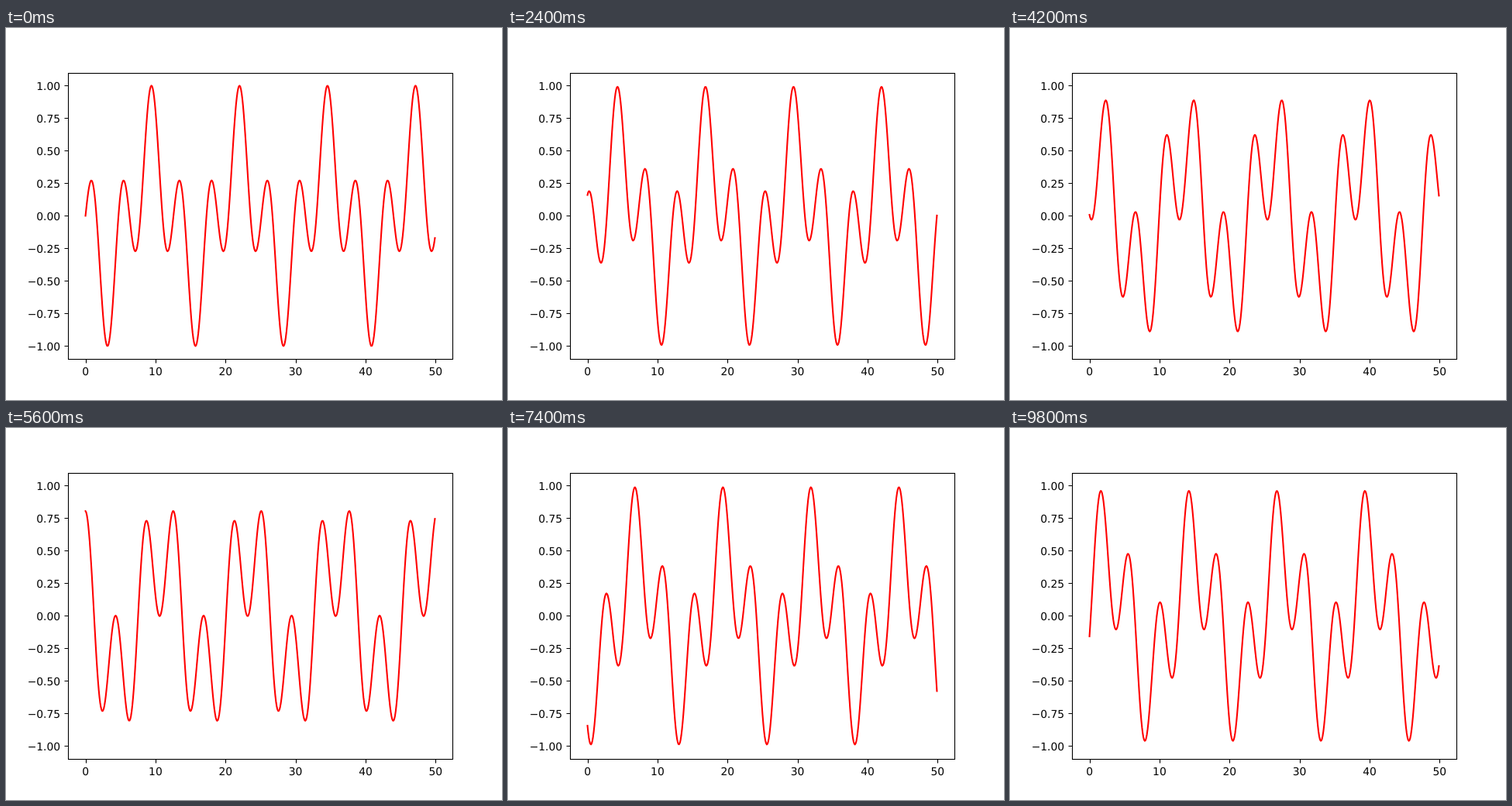
Recreate the animation shown at these times as an HTML page. Size 640 px wide and 480 px high, loop 10 s.

```html
<!DOCTYPE html>
<html lang="en">
<head>
<meta charset="utf-8">
<title>Travelling wave product</title>
<style>
  html, body { margin: 0; width: 100%; height: 100%; overflow: hidden; background: #fff; }
  svg { display: block; width: 640px; height: 480px; }
  text { font: 13.889px "DejaVu Sans", sans-serif; text-rendering: geometricPrecision; }
  .x { text-anchor: middle; }
  .y { text-anchor: end; }
  .axes { fill: none; stroke: #000; stroke-width: 1.111; }
  .curve { fill: none; stroke: #f00; stroke-width: 2.083; stroke-linecap: square; stroke-linejoin: round; }
</style>
</head>
<body>
<svg viewBox="0 0 640 480">
  <path class="curve" id="curve"/>
  <path class="axes" id="ticks"/>
  <rect class="axes" x="80.5" y="58.5" width="496" height="369"/>
  <g id="labels"></g>
</svg>
<script>
const STEP_MS = 200, STEPS = 50;
const curve = document.getElementById('curve');
const labels = document.getElementById('labels');

// Data to stage coordinates
const toX = x => 80 + (x + 2.495) / 54.89 * 496;
const toY = y => 242.4 - y * 168;

function addLabel(cls, x, y, content) {
  const label = document.createElementNS('http://www.w3.org/2000/svg', 'text');
  label.setAttribute('class', cls);
  label.setAttribute('x', x);
  label.setAttribute('y', y);
  label.textContent = content;
  labels.append(label);
}

function drawScales() {
  let ticks = '';
  for (let v = 0; v <= 50; v += 10) {
    ticks += `M${Math.round(toX(v)) + 0.5} 427.5v5`;
    addLabel('x', toX(v), 448, v);
  }
  for (let v = -1; v <= 1; v += 0.25) {
    const y = Math.round(toY(v));
    ticks += `M80.5 ${y + 0.5}h-5`;
    addLabel('y', 70.2, y + 6, (v < 0 ? '\u2212' : '') + Math.abs(v).toFixed(2));
  }
  document.getElementById('ticks').setAttribute('d', ticks);
}

function drawCurve(step) {
  const points = Array.from({ length: 500 }, (_, i) => {
    const x = i / 10;
    const y = Math.cos(x - 0.1 * step) * Math.sin(x / 2 - 0.3 * step);
    return `${toX(x).toFixed(2)} ${toY(y).toFixed(2)}`;
  });
  curve.setAttribute('d', 'M' + points.join('L'));
}

let shown = -1;
function tick() {
  const step = Math.floor(performance.now() / STEP_MS) % STEPS;
  if (step !== shown) drawCurve(shown = step);
  requestAnimationFrame(tick);
}

drawScales();
tick();
</script>
</body>
</html>
```
